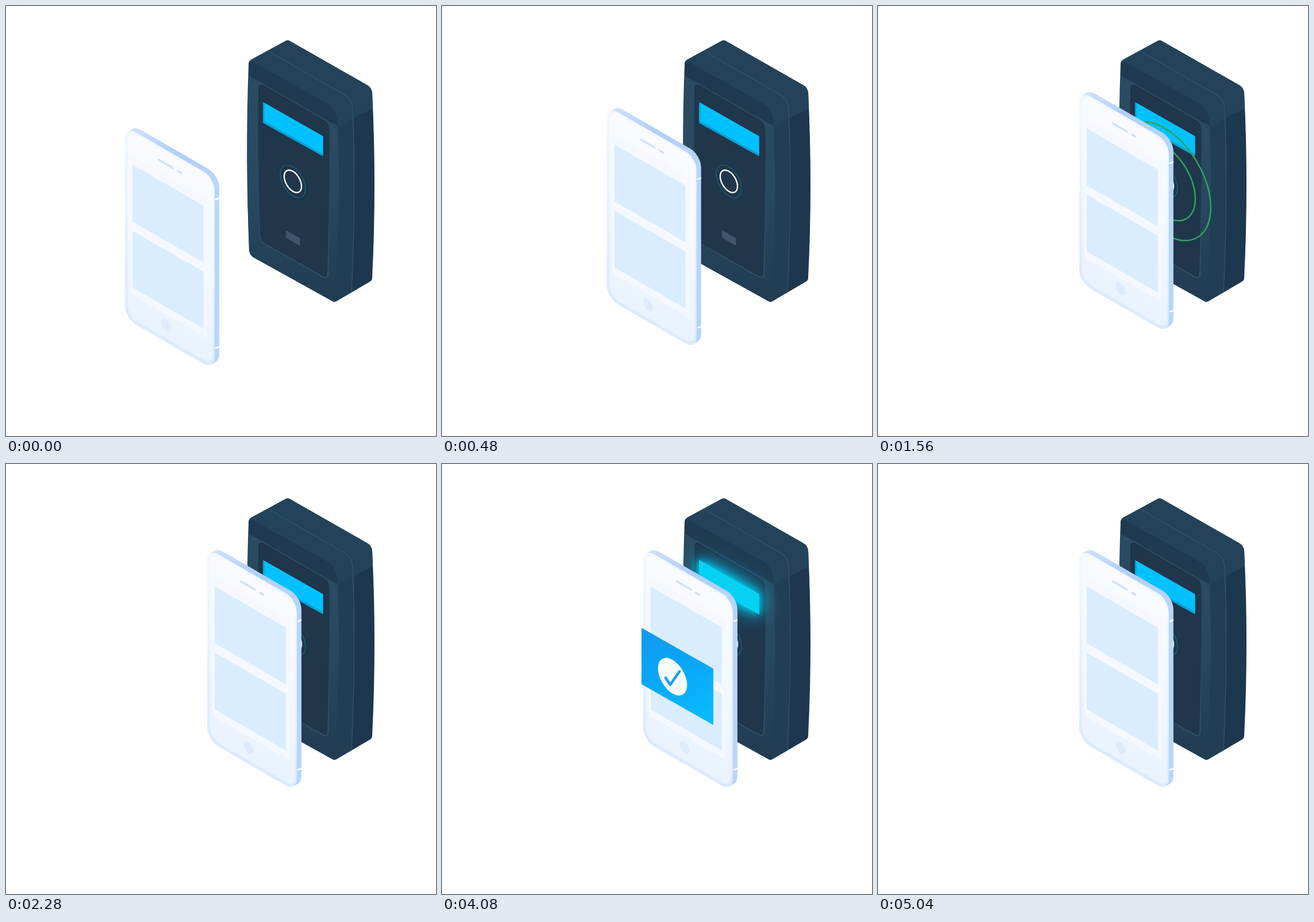
These frames come from a looping animation (748 px wide and 748 px high, 5.16 s). An HTML page with a canvas:

```html
<!DOCTYPE html>
<html>
<head>
<meta charset="utf-8">
<style>
  html, body { margin: 0; height: 100%; overflow: hidden; background: #fff; }
  canvas { display: block; }
</style>
</head>
<body>
<canvas id="stage" width="748" height="748"></canvas>
<script>
const ctx = document.getElementById('stage').getContext('2d');
const LOOP = 5160, STEP = 120;
const clamp = v => Math.max(0, Math.min(1, v));
const span = (t, a, b) => clamp((t - a) / (b - a));

// Cubic bezier easing, solved by bisection
function ease(x, x1, y1, x2, y2) {
  const at = (s, a, b) => 3 * (1 - s) * (1 - s) * s * a + 3 * (1 - s) * s * s * b + s * s * s;
  let lo = 0, hi = 1;
  for (let i = 0; i < 24; i++) {
    const mid = (lo + hi) / 2;
    if (at(mid, x1, x2) < x) lo = mid; else hi = mid;
  }
  return at(lo, y1, y2);
}

function gradient(x0, y0, x1, y1, ...colors) {
  const g = ctx.createLinearGradient(x0, y0, x1, y1);
  colors.forEach((c, i) => g.addColorStop(i / (colors.length - 1), c));
  return g;
}

function fill(path, color) {
  ctx.fillStyle = color;
  ctx.fill(new Path2D(path));
}

function line(path, color, width) {
  ctx.strokeStyle = color;
  ctx.lineWidth = width;
  ctx.stroke(new Path2D(path));
}

// Runs a drawing in the isometric plane whose origin is x, y
function iso(x, y, draw) {
  ctx.save();
  ctx.transform(.866, .5, 0, 1, x, y);
  draw();
  ctx.restore();
}

function box(x, y, w, h, r, color) {
  ctx.beginPath();
  ctx.roundRect(x, y, w, h, r);
  ctx.fillStyle = color;
  ctx.fill();
}

function ring(r, color, width) {
  ctx.beginPath();
  iso(499, 305, () => ctx.arc(0, 0, r, 0, 7));
  ctx.strokeStyle = color;
  ctx.lineWidth = width;
  ctx.stroke();
}

function reader(glow) {
  fill('M422 102Q422 96 427 93L486 61Q490 58.5 494 61L629 138Q636 142 637 151Q645 310 637 473Q637 477 633 479.5L575 513.5Q571 515.5 567 513L430 437Q424 433 423 425Q416 260 422 102Z', '#1d374e');
  fill('M577 208L606 194Q609 345 601 498L571 515Q582 360 577 208Z', '#213e55');
  fill('M422 102Q422 96 427 93L486 61Q490 58.5 494 61L629 138Q636 142 637 151L638 178L577 209Z', '#24435a');
  fill('M422 121L577 208Q583 360 571 515L567 513L430 437Q424 433 423 425Q417 270 422 121Z',
    gradient(0, 140, 0, 500, '#2b4b62', '#284960', '#223d53'));
  fill('M422 102Q422 96 427 96L560 170Q577 180 577 209L422 121Z', '#1f3a50');
  line('M455 78L588 154Q602 162 603 178Q609 340 601 497', '#34566d', 1.2);

  const panel = 'M440 144Q440 135 448 139L551 198Q562 204 562 216Q564 340 560 467Q559 475 551 471L451 414Q442 408 441 399Q438 270 440 144Z';
  fill(panel, '#1f364b');
  line(panel, gradient(0, 140, 0, 470, '#172c40', '#24425a', '#3c5c72'), 1.3);

  ring(36, '#203f55', 1);
  ring(25.4, '#1f6a7e', 1.2);
  ring(17.4, '#fff', 2.3);
  iso(487, 390, () => box(0, 0, 28, 13, 1.5, '#3f566c'));

  const lcd = 'M447 167L551.5 226.5V261.5L447 203.5Z';
  fill(lcd, '#0c9fd0');
  fill('M449.5 168.5L551.5 226.5V257.5L449.5 200.5Z', '#00c1ff');
  if (glow > 0) {
    ctx.save();
    ctx.globalAlpha = glow;
    ctx.shadowColor = '#00c8f0';
    for (const blur of [42, 24, 12]) {
      ctx.shadowBlur = blur;
      fill(lcd, '#06d2f4');
    }
    ctx.restore();
  }
}

function pulse(t) {
  if (t < 1320 || t >= 2280) return;
  const p = 1 - (1 - span(t, 1200, 1800)) ** 1.4;
  ctx.save();
  ctx.globalAlpha = 1 - span(t, 1560, 2160);
  ring(17 + 104 * p, '#2fa35d', 2.5);
  ring(17 + 61 * p, '#2fa35d', 2.5);
  ctx.restore();
}

function phone(dx, dy) {
  ctx.save();
  ctx.translate(dx, dy);
  const side = gradient(0, 0, 180, 0, '#d3e4fe', '#b0cffa', '#b8d5fc');
  for (let d = 8; d >= 0; d--)
    iso(207 + d, 209 - d * .6, () => box(0, 0, 180, 334, 22, side));
  line('M364 337L371 334M364 595L371 593', '#fff', 2.5);

  iso(207, 209, () => {
    box(0, 0, 180, 334, 22, gradient(0, 0, 0, 334, '#f3f8ff', '#e9f2ff', '#dceafe'));
    box(6, 4, 171, 324, 19, gradient(0, 0, 0, 334, '#f9fbff', '#f3f8ff', '#e9f2fe'));
    box(11.5, 43, 153.5, 243, 0, '#f5f9ff');
    for (const y of [59.5, 174.5]) box(15, y, 143, 99, 0, '#daedfe');
    box(66, 22.5, 32, 4, 2, '#cfe0fa');
    box(104, 23, 11, 4, 2, '#cfe0fa');
    box(73, 295, 20, 20, 10, '#dfebfd');
  });
  ctx.restore();
}

function banner(show, lift) {
  if (show <= 0) return;
  ctx.save();
  ctx.globalAlpha = show;
  ctx.translate(16 * (1 - lift), -9 * (1 - lift));
  fill('M347 285L472 356V454L347 383Z', gradient(370, 290, 440, 440, '#0896f0', '#00a5f8', '#00b6ff'));
  iso(401, 370, () => box(-29.3, -29.3, 58.6, 58.6, 29.3, '#fff'));
  ctx.lineCap = ctx.lineJoin = 'round';
  line('M389 372L397 384L413 361', '#0f9df2', 4.6);
  ctx.restore();
}

function draw(now) {
  // Motion advances in even steps
  const t = Math.floor(now % LOOP / STEP) * STEP;
  const slide = ease(span(t, 0, 1200), .31, .15, .42, 1);
  const rise = span(t, 2640, 3000);
  const show = rise * (1 - span(t, 3960, 4560) ** 2);
  ctx.fillStyle = '#fff';
  ctx.fillRect(0, 0, 748, 748);
  reader(show);
  pulse(t);
  phone(143 * slide, -63 * slide);
  banner(show, rise);
}

const start = performance.now();
function tick() {
  draw(performance.now() - start);
  requestAnimationFrame(tick);
}
tick();
</script>
</body>
</html>
```
